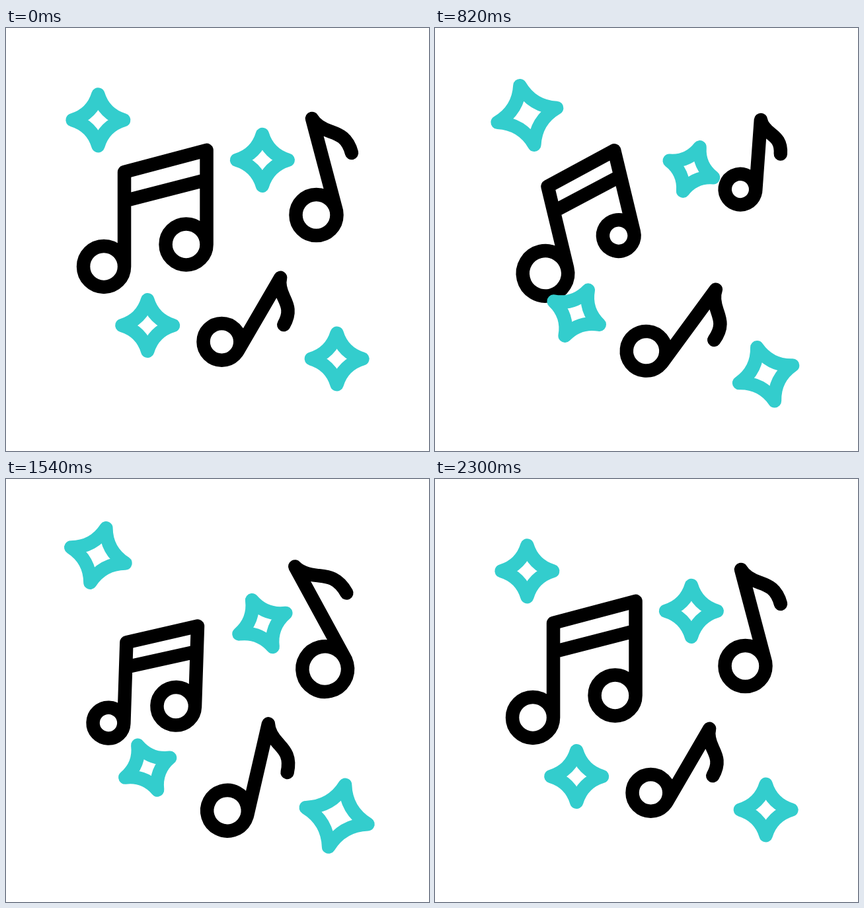
An HTML page with a canvas for the animation above (2.4 s loop, 640x640 px).

```html
<!DOCTYPE html>
<html lang="en">
<head>
<meta charset="utf-8">
<title>Music notes</title>
<style>
  html, body { margin: 0; width: 100%; height: 100%; overflow: hidden; background: #fff; }
  canvas { display: block; width: 640px; height: 640px; }
</style>
</head>
<body>
<canvas id="stage" width="640" height="640"></canvas>
<script>
const LOOP = 2400, STEP = 20;
const BLACK = '#000', TEAL = '#33cdcd', WEIGHT = 20.5;
const ctx = document.getElementById('stage').getContext('2d');
ctx.lineCap = ctx.lineJoin = 'round';

// Smooth curve through evenly spaced values, resting at ends and turning points
function keys(start, step, ...v) {
  const last = v.length - 1;
  const slope = i => {
    const a = v[i] - v[i - 1], b = v[i + 1] - v[i];
    return a * b > 0 ? 2 * a * b / (a + b) : 0;
  };
  return now => {
    const p = Math.min(Math.max((now - start) / step, 0), last);
    const i = Math.min(Math.floor(p), last - 1);
    const u = p - i, r = 1 - u;
    return v[i] * r * r * (1 + 2 * u) + v[i + 1] * u * u * (3 - 2 * u)
      + u * r * (slope(i) * r - slope(i + 1) * u);
  };
}

// Builds the path under a transform, then strokes it at constant width
function draw(x, y, turn, scale, color, path) {
  ctx.save();
  ctx.translate(x, y);
  ctx.rotate(turn * Math.PI / 180);
  ctx.scale(scale, scale);
  ctx.beginPath();
  path();
  ctx.restore();
  ctx.strokeStyle = color;
  ctx.lineWidth = WEIGHT;
  ctx.stroke();
}

function line(x1, y1, x2, y2) {
  ctx.moveTo(x1, y1);
  ctx.lineTo(x2, y2);
}

function ring(x, y, r) {
  ctx.moveTo(x + r, y);
  ctx.arc(x, y, r, 0, 2 * Math.PI);
  ctx.closePath();
}

function notePath() {
  ring(-26.5, 47, 31);
  line(3.5, 39, -33, -99);
  ctx.bezierCurveTo(-28, -90, -18, -84, -5.5, -79.5);
  ctx.bezierCurveTo(7, -75, 20.5, -71, 27, -47);
}

function pairPath(left, right) {
  const x = 62.25;
  ctx.moveTo(-x, 88);
  ctx.lineTo(-x, -55);
  ctx.lineTo(x, -88);
  ctx.lineTo(x, 54.5);
  line(-x, -11.3, x, -43.3);
  ring(-x - left, 88, left);
  ring(x - right, 54.5, right);
}

function starPath() {
  const tip = 38.8, a = 6, b = 18.9;
  ctx.moveTo(0, -tip);
  ctx.bezierCurveTo(a, -b, b, -a, tip, 0);
  ctx.bezierCurveTo(b, a, a, b, 0, tip);
  ctx.bezierCurveTo(-a, b, -b, a, -tip, 0);
  ctx.bezierCurveTo(-b, -a, -a, -b, 0, -tip);
  ctx.closePath();
}

const pair = {
  x: 241.3, y: 272.9,
  bob: keys(90, 495, 0, 22, -22.5, 24, 0),
  scale: keys(90, 495, 1, .785, 1.01, .855, 1),
  turn: keys(160, 535, 0, -18.7, 18.7, -8.5, 0),
  left: keys(100, 720, 31, 34.2, 23.4, 31),
  right: keys(100, 450, 31, 25, 23.5, 28, 31)
};

// tilt, size: resting pose; sway: sideways shift per degree of turn
const notes = [{
  x: 496, y: 236, tilt: 0, size: 1, sway: -.2,
  bob: keys(220, 510, 0, -22.5, 22.5, -22.5, 0),
  turn: keys(220, 408, 0, 20.5, 14.5, -18.5, 15, 0),
  scale: keys(220, 680, 1, .74, 1.11, 1)
}, {
  x: 373.2, y: 461.8, tilt: 45, size: .9, sway: -.4,
  bob: keys(190, 510, 0, 25.5, -25.5, 25.5, 0),
  turn: keys(180, 410, 0, 9.5, .5, -28.5, 19, 0),
  scale: keys(560, 660, 1, 1.2, 1)
}];

// One rise and fall, a swing to each side, and three pulses in size
function star(x, y, start, half, rise, swing, grow) {
  return {
    x, y,
    lift: keys(start, half, 0, rise, 0),
    turn: keys(start, half * 2 / 3, 0, swing, -swing, 0),
    scale: keys(start, half / 3, 1, grow, 1, grow, 1, grow, 1)
  };
}

const stars = [
  star(139.4, 139.3, 500, 900, -25.5, -25, 1.19),
  star(387.9, 199.8, 370, 870, 26, 24, .8),
  star(214.2, 450, 210, 900, -25, 27, .885),
  star(500.6, 500.5, 100, 900, 26, -23, 1.28)
];

function render(now) {
  ctx.fillStyle = '#fff';
  ctx.fillRect(0, 0, 640, 640);

  const scale = pair.scale(now);
  draw(pair.x - 50 * (1 - scale), pair.y + pair.bob(now), pair.turn(now), scale, BLACK,
    () => pairPath(pair.left(now) / scale, pair.right(now) / scale));

  for (const n of notes) {
    const turn = n.turn(now);
    draw(n.x + n.sway * turn, n.y + n.bob(now), n.tilt + turn, n.size * n.scale(now), BLACK, notePath);
  }
  for (const s of stars) {
    draw(s.x, s.y + s.lift(now), s.turn(now), s.scale(now), TEAL, starPath);
  }
}

const begin = performance.now();
function tick() {
  const now = (performance.now() - begin) % LOOP;
  render(Math.floor(now / STEP) * STEP);
  requestAnimationFrame(tick);
}
tick();
</script>
</body>
</html>
```
